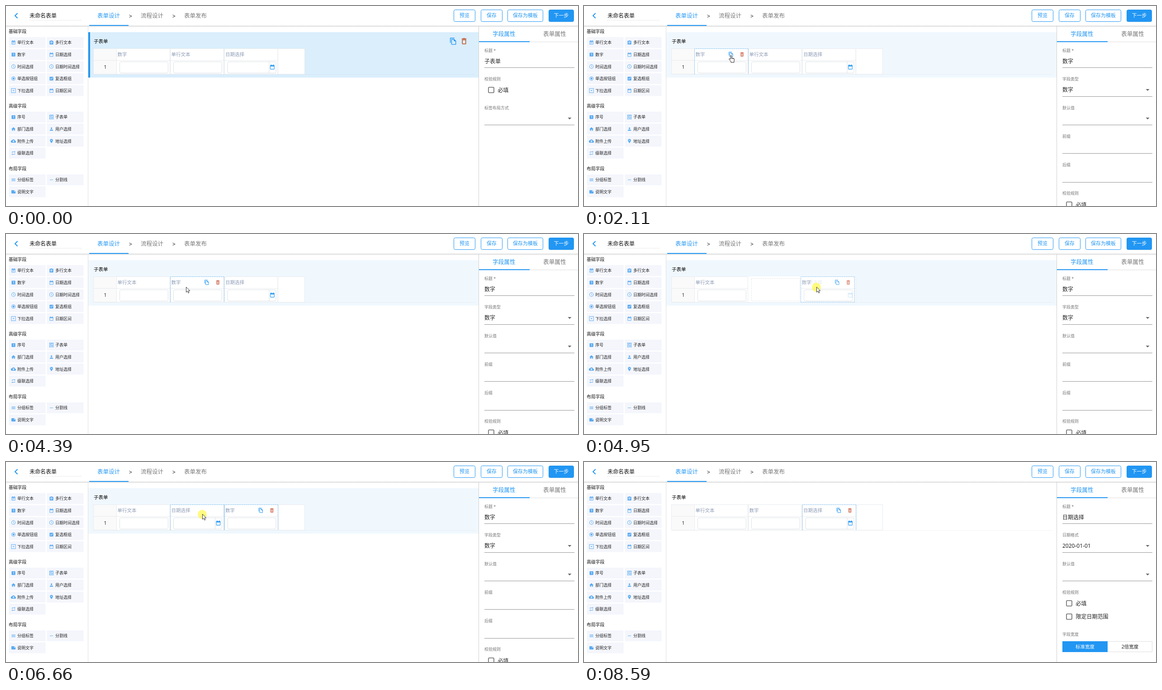
Write an HTML page that moves like this. It is 1265 px wide and 443 px high and loops after 9460 ms.

```html
<!DOCTYPE html>
<html lang="zh-CN">
<head>
<meta charset="utf-8">
<title>表单设计</title>
<style>
html, body { margin: 0; width: 100%; height: 100%; overflow: hidden; background: #fff; }
svg { display: block; width: 100vw; height: 100vh; font-family: 'Noto Sans', 'Noto Sans CJK SC', 'Noto Sans CJK', sans-serif; }
</style>
</head>
<body>
<svg id="stage" viewBox="0 0 1265 443">
  <defs>
    <linearGradient id="shade" x1="0" y1="0" x2="0" y2="1">
      <stop offset="0" stop-color="#000" stop-opacity=".16"/>
      <stop offset="1" stop-color="#000" stop-opacity="0"/>
    </linearGradient>
  </defs>
  <g id="form"></g>
  <g id="fixed"></g>
  <g id="panel"></g>
  <g id="pointer"></g>
</svg>
<script>
const LOOP = 9460, BLUE = '#2196f3', EDGE = '#e8ebee';
const $ = id => document.getElementById(id);

const icons = {
  note: 'M17 10H7v2h10zM19 3h-1V1h-2v2H8V1H6v2H5a2 2 0 0 0-2 2v14a2 2 0 0 0 2 2h14a2 2 0 0 0 2-2V5a2 2 0 0 0-2-2zM19 19H5V8h14zM14 14H7v2h7z',
  page: 'M19 3h-4.2a3 3 0 0 0-5.6 0H5a2 2 0 0 0-2 2v14a2 2 0 0 0 2 2h14a2 2 0 0 0 2-2V5a2 2 0 0 0-2-2zM7 7h10v2H7zM7 11h10v2H7zM7 15h7v2H7z',
  one: 'M3 5a2 2 0 0 1 2-2h14a2 2 0 0 1 2 2v14a2 2 0 0 1-2 2H5a2 2 0 0 1-2-2zM10 7h4v10h-2V9h-2z',
  date: 'M19 4h-1V2h-2v2H8V2H6v2H5a2 2 0 0 0-2 2v14a2 2 0 0 0 2 2h14a2 2 0 0 0 2-2V6a2 2 0 0 0-2-2zM19 20H5V9h14zM7 11h2v2H7zM11 11h2v2h-2zM15 11h2v2h-2z',
  clock: 'M12 2a10 10 0 1 0 0 20 10 10 0 0 0 0-20zM12 4a8 8 0 1 1 0 16 8 8 0 0 1 0-16zM11 7h1.5v5.2l4.5 2.7-.8 1.2L11 13z',
  radio: 'M12 2a10 10 0 1 0 0 20 10 10 0 0 0 0-20zM12 4a8 8 0 1 1 0 16 8 8 0 0 1 0-16zM12 7a5 5 0 1 0 0 10 5 5 0 0 0 0-10z',
  check: 'M19 3H5a2 2 0 0 0-2 2v14a2 2 0 0 0 2 2h14a2 2 0 0 0 2-2V5a2 2 0 0 0-2-2zM10 17l-5-5 1.4-1.4L10 14.2l7.6-7.6L19 8z',
  drop: 'M1 1h22v22H1zM3 3v18h18V3zM7 10h10l-5 5z',
  table: 'M2 1h20v22H2zM4 3v18h16V3zM6 5h12v2H6zM6 9h5v4H6zM13 9h5v2h-5zM13 13h5v2h-5zM6 16h12v2H6z',
  home: 'M10 20v-6h4v6h5v-8h3L12 3 2 12h3v8z',
  user: 'M12 12a4 4 0 1 0 0-8 4 4 0 0 0 0 8zM12 14c-2.7 0-8 1.3-8 4v2h16v-2c0-2.7-5.3-4-8-4z',
  cloud: 'M19.4 10A7.5 7.5 0 0 0 12 4 7.5 7.5 0 0 0 5.4 8 6 6 0 0 0 6 20h13a5 5 0 0 0 .4-10zM14 13v4h-4v-4H7l5-5 5 5z',
  place: 'M12 2a7 7 0 0 0-7 7c0 5.3 7 13 7 13s7-7.7 7-13a7 7 0 0 0-7-7zM12 11.5a2.5 2.5 0 1 1 0-5 2.5 2.5 0 0 1 0 5z',
  repeat: 'M7 7h10v3l4-4-4-4v3H5v6h2zM17 17H7v-3l-4 4 4 4v-3h12v-6h-2z',
  lines: 'M3 18h18v-2H3zM3 13h18v-2H3zM3 6v2h18V6z',
  minus: 'M4 11h16v2H4z',
  memo: 'M22 10l-6-6H4a2 2 0 0 0-2 2v12a2 2 0 0 0 2 2h16a2 2 0 0 0 2-2zM15 5.5l5.5 5.5H15z',
  copy: 'M16 1H4a2 2 0 0 0-2 2v14h2V3h12zM15 5H8a2 2 0 0 0-2 2v14a2 2 0 0 0 2 2h11a2 2 0 0 0 2-2V11zM8 21V7h6v5h5v9z',
  bin: 'M6 7v12a2 2 0 0 0 2 2h8a2 2 0 0 0 2-2V7zM8 9h8v10H8zM15.5 4l-1-1h-5l-1 1H5v2h14V4z',
  slats: 'M6 7v12a2 2 0 0 0 2 2h8a2 2 0 0 0 2-2V7zM8.2 9h1.6v10H8.2zM11.2 9h1.6v10h-1.6zM14.2 9h1.6v10h-1.6zM15.5 4l-1-1h-5l-1 1H5v2h14V4z'
};

const text = (x, cy, s, size, fill, more = '') =>
  `<text x="${x}" y="${cy + size * .38}" font-size="${size}" fill="${fill}" ${more}>${s}</text>`;
const rect = (x, y, w, h, fill, more = '') =>
  `<rect x="${x}" y="${y}" width="${w}" height="${h}" fill="${fill}" ${more}/>`;
const line = (d, stroke, more = '') => `<path d="${d}" fill="none" stroke="${stroke}" ${more}/>`;
const icon = (name, cx, cy, size, fill) =>
  `<path transform="translate(${cx - size / 2} ${cy - size / 2}) scale(${size / 24})" fill-rule="evenodd" fill="${fill}" d="${icons[name]}"/>`;
const MID = 'text-anchor="middle"';

function button(x, w, label, solid) {
  const shadow = solid ? rect(x, 9.5, w, 26, '#000', 'rx="3" opacity=".16"') : '';
  return shadow + rect(x + .5, 8.5, w - 1, 26, solid ? BLUE : '#fff', `rx="3" stroke="${BLUE}"`) +
    text(x + w / 2, 21, label, 11, solid ? '#fff' : BLUE, MID);
}

function palette(title, y, items) {
  const list = items.map(([name, label], i) => {
    const x = 6.5 + 84 * (i % 2), cy = y + 25 + 26.6 * Math.floor(i / 2);
    return rect(x, cy - 12, 81, 24, '#f4f6fc') + icon(name, x + 10, cy, 11, '#58aaf2') +
      text(x + 18.5, cy, label, 9, '#222');
  });
  return text(6, y, title, 9.8, '#111') + list.join('');
}

function drawFixed() {
  const tabs = [['表单设计', 202, BLUE], ['流程设计', 298, '#777'], ['表单发布', 394, '#777']];
  return rect(0, 0, 1265, 44, '#fff') + rect(0, 43.5, 1265, 4, 'url(#shade)') +
    line('M25.5 16L20 21.5l5.5 5.5', BLUE, 'stroke-width="2"') +
    text(52, 21, '未命名表单', 12, '#111') +
    line('M52 31.5H168', '#ddd', 'stroke-dasharray="2 1.5"') +
    tabs.map(([s, x, c]) => text(x, 21.5, s, 12.5, c)).join('') +
    text(275.5, 22, '&gt;', 12, '#222', MID) + text(371.5, 22, '&gt;', 12, '#222', MID) +
    rect(184, 42, 87, 2, BLUE) +
    button(990, 48, '预览') + button(1050, 48, '保存') + button(1109, 79, '保存为模板') +
    button(1200, 56, '下一步', true) +
    rect(181, 45, 1, 398, '#e0e0e0') + rect(1045, 44, 1, 399, '#cfcfcf') +
    palette('基础字段', 56, [['note', '单行文本'], ['page', '多行文本'], ['one', '数字'], ['date', '日期选择'],
      ['clock', '时间选择'], ['clock', '日期时间选择'], ['radio', '单选按钮组'], ['check', '复选框组'],
      ['drop', '下拉选择'], ['date', '日期区间']]) +
    palette('高级字段', 221, [['one', '序号'], ['table', '子表单'], ['home', '部门选择'], ['user', '用户选择'],
      ['cloud', '附件上传'], ['place', '地址选择'], ['repeat', '级联选择']]) +
    palette('布局字段', 360, [['lines', '分组标签'], ['minus', '分割线'], ['memo', '说明文字']]) +
    text(1076, 61, '字段属性', 12.7, BLUE) + text(1188, 61, '表单属性', 12.7, '#777') +
    rect(1046, 79, 219, 1, '#ddd') + rect(1046, 78, 112, 2, BLUE);
}

// Right-hand property panel
const caption = (row, s) => text(1058, 98.5 + 63.3 * row, s, 9, '#757575');
function field(row, label, value = '', arrow = false) {
  const y = 63.3 * row;
  return caption(row, label) + text(1058, 122.5 + y, value, 12, '#222') +
    rect(1058, Math.round(136.4 + y), 199, 1, '#949494') +
    (arrow ? `<path d="M1242.5 ${120.6 + y}h8l-4 4z" fill="#666"/>` : '');
}
const tick = (cy, s) =>
  rect(1067, cy - 6, 12, 12, '#fff', 'rx="1.5" stroke="#666" stroke-width="1.6"') + text(1087.5, cy, s, 12, '#222');

const panels = {
  form: field(0, '标题 *', '子表单') + caption(1, '校验规则') + tick(186, '必填') + field(2, '标签布局方式', '', true),
  num: field(0, '标题 *', '数字') + field(1, '字段类型', '数字', true) + field(2, '默认值', '', true) +
    field(3, '前缀') + field(4, '后缀') + caption(5, '校验规则') + tick(440, '必填'),
  date: field(0, '标题 *', '日期选择') + field(1, '日期格式', '2020-01-01', true) + field(2, '默认值', '', true) +
    caption(3, '校验规则') + tick(313, '必填') + tick(342.5, '限定日期范围') + text(1058, 382, '字段宽度', 9, '#757575') +
    rect(1157.5, 397.5, 99, 23, '#fff', 'stroke="#ddd"') + rect(1058, 397, 100, 24, BLUE) +
    text(1108, 409, '标准宽度', 10.5, '#fff', MID) + text(1207.5, 409, '2倍宽度', 10.5, '#222', MID)
};

// Pointer path: time, x, y, eased
const path = [
  [550, 1063, 400], [1410, 300, 117, 1], [1640, 300, 117], [2030, 325, 109, 1], [2300, 325, 109],
  [2440, 306, 111, 1], [2580, 306, 111], [2900, 405, 111], [3060, 470, 113], [3920, 470, 113],
  [4390, 398, 117, 1], [4470, 398, 117], [4810, 503, 117], [5260, 538, 117], [5490, 544, 117],
  [5570, 547, 117], [5700, 550, 117], [6100, 550, 117], [6580, 434, 115, 1], [6700, 434, 115],
  [7040, 544, 115, 1], [8290, 544, 115], [8570, 981, 203, 1]
];
const presses = [[1640, 1800], [2580, 3600], [4470, 5950], [6640, 7270], [7830, 7890]];
const drags = [
  { from: 0, start: 2580, end: 3600, grab: 306, swap: 3220, span: 280 },
  { from: 1, start: 4470, end: 5950, grab: 398, swap: 5500, span: 320 },
  { from: 1, start: 6700, end: 7270, grab: 434, swap: 7030, span: 200 }
];
const names = { num: '数字', text: '单行文本', date: '日期选择' };
const slotX = i => 244 + 119 * i + (i > 1 ? .5 : 0);
const clamp = v => Math.max(0, Math.min(1, v));

function pointerAt(t) {
  const i = path.findIndex(p => p[0] > t);
  if (i < 1) return null;
  const [t0, x0, y0] = path[i - 1], [t1, x1, y1, eased] = path[i];
  let k = (t - t0) / (t1 - t0);
  if (eased) k = k * k * (3 - 2 * k);
  return { x: x0 + (x1 - x0) * k, y: y0 + (y1 - y0) * k };
}

const frame = (x, closed) =>
  line(`M${x + .5} 151V94.5H${x + 119.5}V151${closed ? 'z' : ''}`, '#74bdf5', 'stroke-dasharray="2.4 1.6"');

function column(key, x, tools) {
  return rect(x + .5, 94.5, 118, 56.5, '#fff', `stroke="${EDGE}"`) +
    line(`M${x} 120.5h119`, EDGE) + text(x + 2.5, 107.5, names[key], 10.5, '#8c9ab4') +
    rect(x + 7.5, 123.5, 107, 25, '#fff', 'rx="3" stroke="#dcdfe3"') +
    (key === 'date' ? line(`M${x + 99.5} 124v24`, '#dcdfe3') + icon('date', x + 106.5, 135, 13, BLUE) : '') +
    (tools ? icon('copy', x + 81, 107, 12, BLUE) + icon('slats', x + 105.5, 107, 13, '#cf6a50') : '');
}

const gap = x => rect(x, 94, 119, 57, '#fff') +
  rect(x + 7.5, 98.5, 107, 50, 'none', 'stroke="#e2e5e8" stroke-dasharray="3 2"');

function drawForm(t, tip, selected) {
  const order = ['num', 'text', 'date'];
  let drag = null;
  for (const d of drags) {
    if (t >= d.end) [order[d.from], order[d.from + 1]] = [order[d.from + 1], order[d.from]];
    else if (t >= d.start && tip.x - d.grab > .5) drag = d;
  }
  const inside = tip && tip.x > 182 && tip.x < 1045 && tip.y > 58 && tip.y < 158;
  const whole = selected === 'form';
  let out = rect(182, 58, 863, 100.5, whole ? '#daeefc' : inside ? '#f0f8fe' : '#fff');
  if (whole) out += rect(182, 58, 4, 100.5, BLUE) + icon('copy', 989, 78, 17, BLUE) + icon('bin', 1013, 78, 18, '#bf4a20');
  out += text(194, 78, '子表单', 10.5, '#000', `font-weight="${whole || inside ? 500 : 400}"`) +
    line('M194 151.5H1037', '#000', 'opacity=".045"') +
    rect(193.5, 94.5, 51, 56.5, '#fafafa', `stroke="${EDGE}"`) + line('M194 120.5h50', EDGE) +
    text(219.5, 135, '1', 10.5, '#222', MID);
  if (!drag) out += rect(601.5, 94.5, 59, 56.5, '#fff', `stroke="${EDGE}"`);

  const hover = tip && !drag && tip.y > 94 && tip.y < 151 ? Math.floor((tip.x - 244) / 119.2) : -1;
  const shift = drag ? 119.5 * clamp((t - drag.swap) / drag.span) : 0;
  let frames = '';
  order.forEach((key, i) => {
    if (drag && i === drag.from) return;
    const x = slotX(i) - (drag && i === drag.from + 1 ? shift : 0);
    out += column(key, x, key === selected);
    if (key === selected || i === hover) frames += frame(x);
  });
  out += frames;
  if (drag) {
    const key = order[drag.from], x = slotX(drag.from) + tip.x - drag.grab;
    out += gap(slotX(drag.from) + shift) +
      `<g opacity=".8">${column(key, x, key === selected)}${frame(x, true)}</g>`;
  }
  const own = slotX(order.indexOf(selected));
  const hand = tip && !drag && order.includes(selected) && Math.abs(tip.x - own - 81) < 6 && tip.y < 113 && tip.y > 100;
  return { out, hand };
}

const arrow = '<path d="M.5 .5v11.5l2.7-2.5 1.9 4.3 1.9-.8-1.9-4.2h3.7z" fill="#fff" stroke="#222" stroke-width=".9"/>';
const hand = '<path d="M-1 1.5c0-2 2.6-2 2.6 0V6l4.4 1c1.2.4 1.6 1 1.5 2.2L6.8 13v3H0v-2.2L-4 9.2c-.8-1.3.8-2.3 1.8-1.3L-1 9z" fill="#fff" stroke="#222"/>' +
  '<path d="M1.6 6v2.5M3.7 6.5v2M5.7 7v2" stroke="#222" stroke-width=".8"/>';

let shown = '';
function render(t) {
  const tip = pointerAt(t);
  const selected = t < 1700 ? 'form' : t < 7830 ? 'num' : 'date';
  const form = drawForm(t, tip, selected);
  $('form').innerHTML = form.out;
  if (shown !== selected) $('panel').innerHTML = panels[shown = selected];
  let mark = '';
  if (tip) {
    const down = presses.some(([a, b]) => t >= a && t < b);
    mark = `<g transform="translate(${tip.x} ${tip.y})">` +
      (down ? '<circle cy="1" r="10" fill="#fff83c" opacity=".65"/>' : '') + (form.hand ? hand : arrow) + '</g>';
  }
  $('pointer').innerHTML = mark;
}

$('fixed').innerHTML = drawFixed();
const begin = performance.now();
function loop() {
  render((performance.now() - begin) % LOOP);
  requestAnimationFrame(loop);
}
loop();
</script>
</body>
</html>
```
